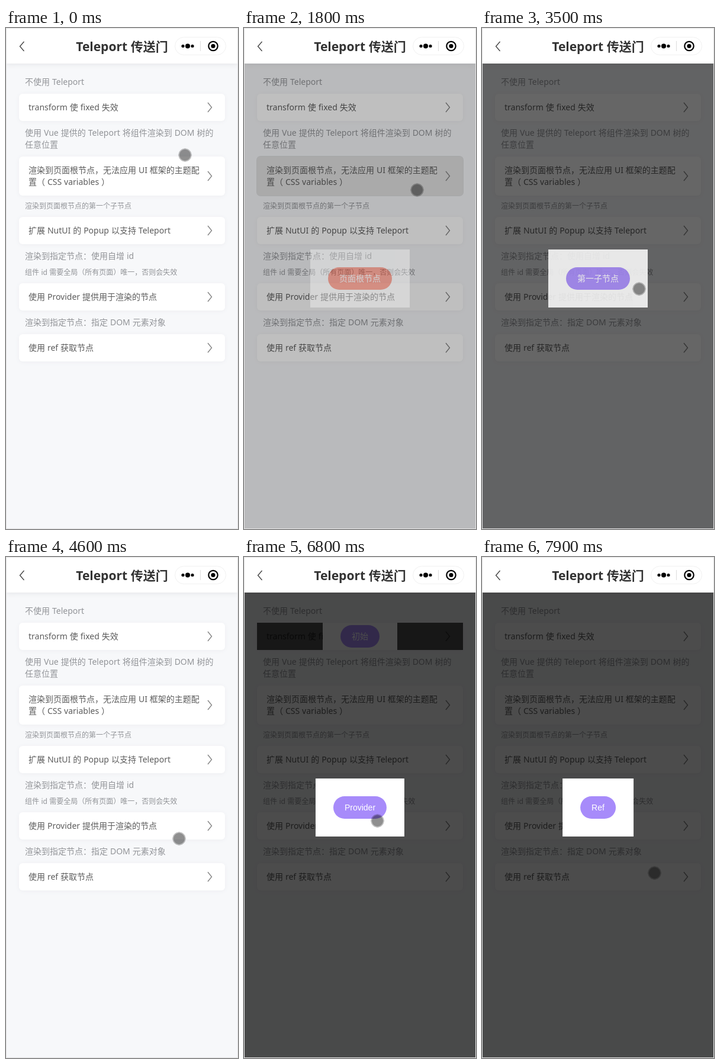
Animation, 392 px wide and 846 px high, one loop 8000 ms. Source, as an HTML page:

```html
<!DOCTYPE html>
<html lang="zh-CN">
<head>
<meta charset="utf-8">
<title>Teleport 传送门</title>
<style>
  * { box-sizing: border-box; }
  html, body { margin: 0; width: 100%; height: 100%; overflow: hidden; background: #fff; }
  #stage { position: relative; width: 392px; height: 846px; overflow: hidden; background: #f7f8fa;
    font: 14px/20px "Noto Sans", "Noto Sans CJK SC", "Noto Sans CJK", sans-serif;
    word-spacing: .3px; white-space: nowrap; }
  #stage > *, .cell > *, .mask, .box { position: absolute; }
  #list { left: 22px; top: 81px; width: 348px; display: flex; flex-direction: column; gap: 10px; }
  .note { padding-left: 10px; color: #929498; }
  .small { font-size: 12px; line-height: 16px; }
  .cell { position: relative; padding: 13px 16px; border-radius: 6px; background: #fff;
    color: #5c5c5c; box-shadow: 0 1px 7px #edeef1; }
  .pressed { box-shadow: inset 0 0 0 99px rgba(0,0,0,.11), 0 0 0 1px rgba(0,0,0,.11); }
  .cell svg { right: 20px; top: calc(50% - 9px); }
  .clip { inset: 0; overflow: hidden; }
  .page { inset: 60px 1px 1px; }
  .mask { inset: 0; background: rgba(0,0,0,.7); }
  .box { left: 50%; top: 50%; height: 98px; padding: 30px; background: #fff; transform: translate(-50%, -50%); }
  .page .box { top: 363px; }
  .box b { display: block; height: 38px; padding: 0 19px; border-radius: 19px; color: #fff;
    font: 14px/38px "Liberation Sans", "Noto Sans CJK SC", "Noto Sans CJK", sans-serif; }
  #shade, #nav { left: 0; top: 0; width: 392px; height: 60px; background: #fff; }
  #shade { box-shadow: 0 1px 9px #e2e3e6; }
  #nav h1 { margin: 0; font-size: 21px; line-height: 62px; text-align: center; color: #333; }
  #nav svg { position: absolute; left: 0; top: 0; }
  #blank { inset: 0; background: #fff; }
  #frame { inset: 0; border: 1px solid #e4e4e4; }
  #cursor { width: 23px; height: 23px; margin: -11.5px; border-radius: 50%;
    background: radial-gradient(rgba(0,0,0,.44) 9px, rgba(0,0,0,.24) 9.8px 11px, transparent 11.5px); }
</style>
</head>
<body>
<div id="stage">
  <div id="list">
    <div class="note">不使用 Teleport</div>
    <div class="cell">transform 使 fixed 失效</div>
    <div class="note">使用 Vue 提供的 Teleport 将组件渲染到 DOM 树的<br>任意位置</div>
    <div class="cell">渲染到页面根节点，无法应用 UI 框架的主题配<br>置（ CSS variables ）</div>
    <div class="note small">渲染到页面根节点的第一个子节点</div>
    <div class="cell">扩展 NutUI 的 Popup 以支持 Teleport</div>
    <div class="note">渲染到指定节点：使用自增 id</div>
    <div class="note small">组件 id 需要全局（所有页面）唯一，否则会失效</div>
    <div class="cell">使用 Provider 提供用于渲染的节点</div>
    <div class="note">渲染到指定节点：指定 DOM 元素对象</div>
    <div class="cell">使用 ref 获取节点</div>
  </div>
  <div id="shade"></div>
  <div id="nav">
    <h1>Teleport 传送门</h1>
    <svg width="392" height="60" fill="none">
      <path d="M30.5 23l-7 8 7 8" stroke="#444" stroke-width="1.4"/>
      <rect x="285.5" y="15.5" width="86" height="30" rx="15" stroke="#f1f1f1"/>
      <path d="M328.5 22v17" stroke="#ddd"/>
      <g fill="#000">
        <circle cx="299" cy="30.5" r="2.6"/><circle cx="307" cy="30.5" r="4"/>
        <circle cx="315" cy="30.5" r="2.6"/><circle cx="350" cy="30.5" r="3.6"/>
      </g>
      <circle cx="350" cy="30.5" r="7.7" stroke="#000" stroke-width="2.2"/>
    </svg>
  </div>
  <div id="blank"></div>
  <div id="frame"></div>
  <div id="cursor"></div>
</div>
<script>
const $ = id => document.getElementById(id);
const cells = [...document.querySelectorAll('.cell')];
const arrow = '<svg width="12" height="18" fill="none" stroke="#858585" stroke-width="1.4"><path d="M3 1l6.5 8L3 17"/></svg>';
cells.forEach(cell => cell.insertAdjacentHTML('beforeend', arrow));

const LOOP = 8000, PURPLE = '#a78bfa', RED = '#fa3a19';

// One popup per cell: label, colour, [open, close] spans in ms
const popups = [
  ['初始', PURPLE, [350, 1150], [5350, 6850]],
  ['页面根节点', RED, [1740, 2600]],
  ['第一子节点', PURPLE, [3315, 3700]],
  ['Provider', PURPLE, [6150, 6850]],
  ['Ref', PURPLE, [7600, LOOP]],
].map(([label, color, ...spans], i) => {
  const layer = document.createElement('div');
  layer.className = i ? 'page' : 'clip';
  layer.innerHTML = `<div class="mask"></div><div class="box"><b style="background:${color}">${label}</b></div>`;
  if (i) $('nav').before(layer); else cells[0].append(layer);
  return { layer, spans, cell: cells[i] };
});

// Pointer stops: arrival time, x, y
const stops = [
  [0, 302.5, 214.5], [400, 303, 140], [1600, 292, 273], [2600, 214.5, 440.5],
  [3300, 292, 350], [3500, 265.5, 440.5], [3700, 220, 440], [4600, 292.5, 475.5],
  [5000, 306, 130], [6000, 288, 461], [6800, 225.5, 445.5], [7400, 291.5, 533.5],
];

const progress = (t, from, length) => Math.max(0, Math.min(1, (t - from) / length));
const easeOut = k => 1 - (1 - k) ** 2;

// The pointer rests at each stop, then glides for at most 500 ms to the next
function pointerAt(t) {
  let [before, x, y] = stops[0];
  for (const [arrival, nextX, nextY] of stops.slice(1)) {
    const length = Math.min(500, arrival - before);
    const k = progress(t, arrival - length, length);
    x += (nextX - x) * k;
    y += (nextY - y) * k;
    before = arrival;
  }
  return [x, y];
}

function draw(now) {
  const t = Math.floor(now % LOOP / 100) * 100;
  for (const { layer, spans, cell } of popups) {
    let shown = 0;
    for (const [open, close] of spans)
      shown += easeOut(progress(t, open, 300)) * (1 - easeOut(progress(t, close, 200)));
    layer.style.display = shown ? '' : 'none';
    for (const part of layer.children) part.style.opacity = shown;
    cell.classList.toggle('pressed', spans.some(([open]) => t >= open && t < open + 150));
  }
  $('blank').hidden = t < 2600 || t >= 2800;
  const [x, y] = pointerAt(t);
  $('cursor').style.left = x + 'px';
  $('cursor').style.top = y + 'px';
}

const start = performance.now();
(function loop() {
  draw(performance.now() - start);
  requestAnimationFrame(loop);
})();
</script>
</body>
</html>
```
